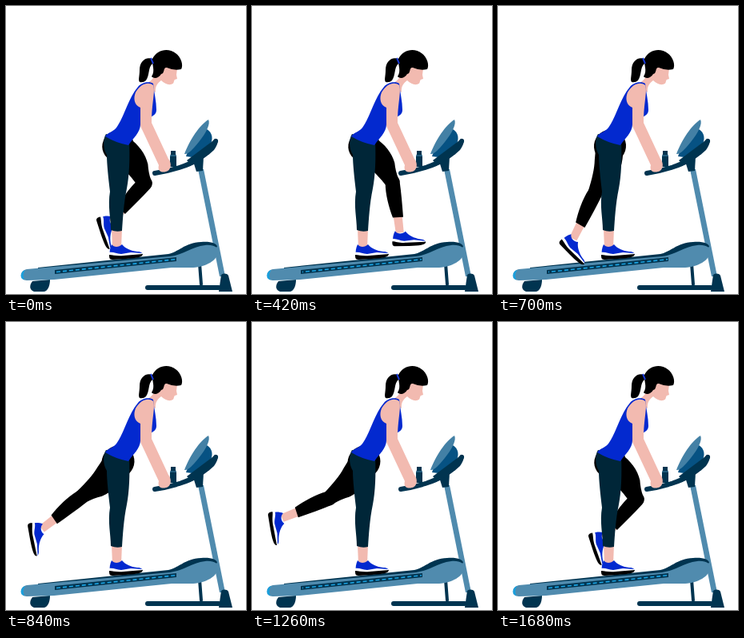
Animation, 300 px wide and 360 px high, one loop 1.75 s. Source, as an HTML page:

```html
<!DOCTYPE html>
<html lang="en">
<head>
<meta charset="utf-8">
<title>Treadmill leg swing</title>
<style>
  html, body { margin: 0; width: 100%; height: 100%; overflow: hidden; background: #fff; }
  svg { display: block; width: 100vw; height: 100vh; }
  .steel { fill: #508bae; }
  .deep { fill: #003450; }
  .pants { fill: #002638; }
  .skin { fill: #f2bab0; }
  .blue { fill: #0329cf; }
  .line { fill: none; stroke: #003450; stroke-linecap: round; stroke-linejoin: round; }
</style>
</head>
<body>
<svg viewBox="0 0 300 360">
  <defs>
    <g id="shoe">
      <path class="blue" d="M-6-2 C-3 2 3 2 7-2 C11 3 18 6 26 7 C31 7 33 9 32 11 L-8 12 C-9 7-8 2-6-2Z"/>
      <path d="M-9 8 C-4 7 0 10 6 10 L18 8 L32 9 V12 L-9 13Z" fill="#fff"/>
      <path d="M-9 11 C-4 11 0 13 9 12 L33 10 C33 14 25 15 12 16 L-5 17 C-9 17-9 14-9 11Z"/>
    </g>
  </defs>

  <g id="treadmill">
    <path class="line" d="M177 352 H266" stroke-width="6"/>
    <path class="line" d="M242 322 L244 348" stroke-width="4"/>
    <path class="deep" d="M33 344 L55 342 C55 350 52 357 47 357 L35 357 C29 355 29 349 33 344Z"/>
    <path class="steel" d="M240 204 L247 204 L274 338 L267 338Z"/>
    <path class="deep" d="M269 336 C272 334 276 334 278 337 L283 357 L266 357Z"/>
    <path class="deep" d="M40 327 L203 310 C215 308 223 296 244 295 C256 294 264 297 264 301 L230 318 L40 330Z"/>
    <path class="steel" d="M26 329 L205 313 C222 311 232 301 249 299 C260 298 266 302 265 308 C264 318 250 326 234 327 L207 327 L60 342 L26 343 C17 343 16 331 26 329Z"/>
    <path d="M24 330 C17 332 17 342 23 342 Q20 336 24 330Z" fill="#1b9fdc"/>
    <path class="deep" d="M61 330 L213 314 V319 L61 335Z"/>
    <path id="belt" d="M63 332.500 L212 316.700" fill="none" stroke="#1ba4e4" stroke-width="1.600" stroke-dasharray="5 3"/>
    <path d="M251 154 C258 158 260 167 254 175 L241 190 L225 188 C229 174 240 163 251 154Z" fill="#065283"/>
    <path d="M253 142 C256 147 250 159 241 170 C233 180 227 186 223 185 C228 172 239 151 253 142Z" fill="#4380a5"/>
    <path class="deep" d="M232 188 H247 L246 206 L238 207Z"/>
    <path class="line" d="M186 209 C207 206 229 199 239 192 Q253 184 262 169" stroke-width="6"/>
    <path class="deep" d="M226 193 L262 166 C267 165 265 173 260 180 C253 187 242 194 232 199Z"/>
    <path class="deep" d="M206 181 H212 V185 L213 188 V201 H205 V188 L206 185Z"/>
    <path d="M205 187 H213" stroke="#4380a5"/>
  </g>

  <g id="farLeg">
    <g id="thigh">
      <circle r="20"/>
      <path d="M-18 0 L17 0 C22 14 22 30 17 42 Q11 52 9 60 A9 9 0 0 1-9 60 C-9 45-10 32-13 22Z"/>
    </g>
    <g id="shin">
      <path class="skin" d="M-5 42 H6 L5 64 H-5Z"/>
      <path d="M-9 0 C-11 14-9 30-6 44 L7 45 C8 30 9 15 9 0 A9 9 0 0 0-9 0Z"/>
    </g>
    <use id="foot" href="#shoe"/>
  </g>

  <g id="nearLeg">
    <path class="skin" d="M132 278 H145 L144 303 H133Z"/>
    <use href="#shoe" transform="translate(138 300)"/>
    <path class="pants" d="M125 160 L154 168 C155 192 154 212 151 228 C147 247 146 267 145 281 Q138 283 131 280 C131 265 127 250 130 232 C128 215 126 197 126 186 C121 178 121 166 125 160Z"/>
  </g>

  <g id="torso">
    <path class="skin" d="M186 80 C187 89 182 93 175 98 L187 108 C186 100 190 96 194 93 Q200 99 206 98 C211 97 209 94 211 92 L214 91 L213 86 L214 78 L204 70 L188 72Z"/>
    <path class="blue" d="M165 101 C170 95 180 94 184 97 C185 108 188 119 188 130 C188 136 183 137 180 140 L168 148 C168 158 159 165 153 174 Q137 171 124 163 C128 157 135 158 140 149 C149 135 153 115 165 101Z"/>
    <path class="skin" d="M162 108 C168 97 178 94 184 99 C187 107 182 121 182 146 L203 191 C208 197 206 206 200 207 C194 209 189 206 191 199 L168 150 L168 127 C160 124 159 115 162 108Z"/>
    <path d="M183 66 C174 63 167 70 167 80 C167 88 165 92 167 95 Q172 96 175 93 C180 86 177 78 183 72Z"/>
    <path d="M183 66 C189 54 203 52 212 59 C219 64 222 74 219 79 Q210 81 201 77 C196 76 199 84 194 85 C190 92 183 90 182 88 C187 81 182 73 183 66Z"/>
    <path d="M181 65 L184 72" stroke="#1736d0" stroke-width="2"/>
  </g>
</svg>
<script>
  const STEP = 70, LOOP = 1750, SWING_STEPS = 24;
  const HIP = [140, 175], THIGH = 60, SHIN = 64;

  const [belt, thigh, shin, foot] = ['belt', 'thigh', 'shin', 'foot'].map(id => document.getElementById(id));
  const cos = deg => Math.cos(deg * Math.PI / 180);
  const sin = deg => Math.sin(deg * Math.PI / 180);

  // Angles are measured from straight down, positive towards the console
  const reach = ([x, y], angle, length) => [x + length * sin(angle), y + length * cos(angle)];

  const smoothstep = x => {
    const u = Math.min(1, Math.max(0, x));
    return u * u * (3 - 2 * u);
  };

  function place(el, [x, y], turn, stretch = 1) {
    el.setAttribute('transform', `translate(${x} ${y}) rotate(${turn}) scale(1 ${stretch})`);
  }

  function draw() {
    const step = Math.floor(performance.now() % LOOP / STEP);
    const phase = 360 * step / SWING_STEPS;

    // Each joint swings as a wave plus a weak second harmonic
    const thighAngle = -4 + 58 * cos(phase - 45) - 2.7 * cos(2 * phase - 63);
    const shinAngle = -38 + 38 * cos(phase - 83) - 8.8 * cos(2 * phase - 14);
    const pitch = 2 + 82 * smoothstep((10 - shinAngle) / 65);

    const thighLength = THIGH - 4 * sin(thighAngle);
    const knee = reach(HIP, thighAngle, thighLength);
    const ankle = reach(knee, shinAngle, SHIN);

    place(thigh, HIP, -thighAngle, thighLength / THIGH);
    place(shin, knee, -shinAngle);
    place(foot, ankle, pitch);
    belt.setAttribute('stroke-dashoffset', step * 2);
    requestAnimationFrame(draw);
  }
  draw();
</script>
</body>
</html>
```
